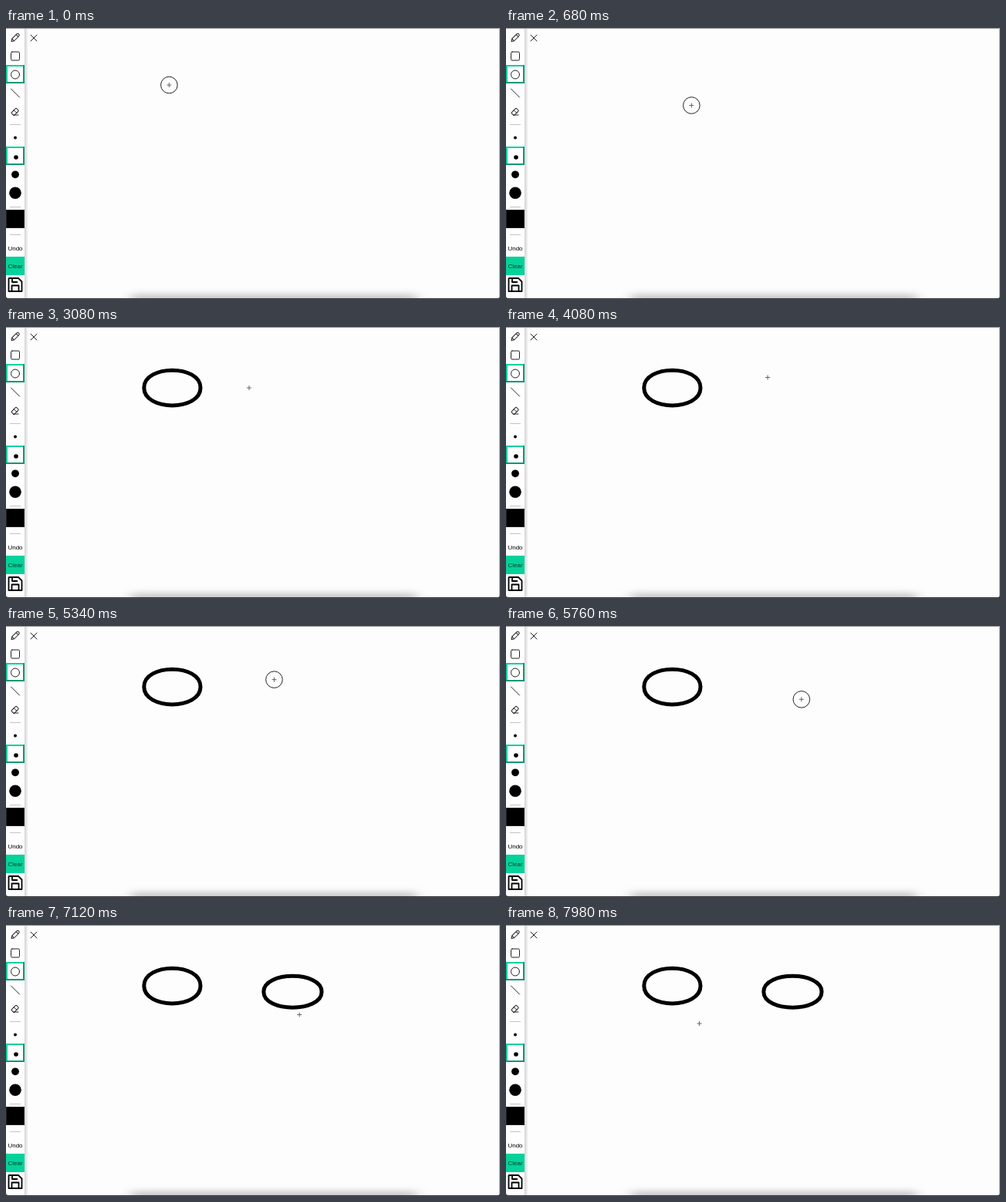
Animation, 640 px wide and 352 px high, one loop 8000 ms. Source, as an HTML page:

```html
<!DOCTYPE html>
<html lang="en">
<head>
<meta charset="utf-8">
<title>Whiteboard</title>
<style>
  html, body { margin: 0; width: 100%; height: 100%; overflow: hidden; background: #fdfdfd; }
  svg { display: block; width: 640px; height: 352px; }
  text { font: 8px "Liberation Sans", Arial, sans-serif; text-anchor: middle; }
  .icon { fill: none; stroke: #222; stroke-linecap: round; stroke-linejoin: round; }
  .shape { fill: none; stroke: #000; stroke-width: 5; }
</style>
</head>
<body>
<svg viewBox="0 0 640 352">
  <defs>
    <linearGradient id="edge">
      <stop stop-color="#d2d2d6"/>
      <stop offset="1" stop-color="#fdfdfd"/>
    </linearGradient>
    <filter id="soft" x="-10%" y="-200%" width="120%" height="500%">
      <feGaussianBlur stdDeviation="8 4"/>
    </filter>
  </defs>

  <rect width="640" height="352" fill="#fdfdfd"/>
  <rect x="162" y="346" width="370" height="14" fill="#c4c4c4" filter="url(#soft)"/>
  <rect x="24" width="5" height="352" fill="url(#edge)"/>
  <rect width="24" height="352" fill="#fefefe"/>
  <g id="toolbar"></g>
  <path class="icon" d="M32 9l8 8m0-8l-8 8"/>

  <!-- Window frame -->
  <path d="M0 .5H639.500V352" stroke="#999" fill="none"/>
  <path d="M0 348q0 3 3 3h634q3 0 3-3v4H0z" fill="#333"/>

  <path id="first" class="shape"/>
  <path id="second" class="shape"/>
  <g id="cursor" fill="none">
    <circle id="ring" r="10.800" stroke="#222"/>
    <path d="M-3 0H3M0-3V3" stroke="#555" stroke-width=".9"/>
  </g>
</svg>
<script>
  const LOOP = 8000, ROW = 24;
  const FIRST_RELEASE = 1560, SECOND_PRESS = 4640, SECOND_RELEASE = 6560;
  const byId = id => document.getElementById(id);
  const cursor = byId('cursor'), ring = byId('ring');
  const first = byId('first'), second = byId('second');

  // Toolbar parts, each placed by its vertical centre
  const at = (y, content) => `<g transform="translate(12 ${y})">${content}</g>`;
  const icon = content => `<g class="icon">${content}</g>`;
  const dot = radius => `<circle r="${radius}"/>`;
  const divider = '<path d="M-7 0H7" stroke="#c4c4c4"/>';
  const selection = `<g fill="none" stroke-width="2">
    <path d="M-11 12V-11H12" stroke="#06d0a0"/><path d="M-12 11H11V-12" stroke="#109878"/></g>`;
  const tools = [
    '<path transform="rotate(45)" d="M-2-4.500V4L0 7 2 4V-4.500q0-2-2-2t-2 2zM-2-3.500H2M-2 4H2"/>',
    '<rect x="-5.500" y="-5.500" width="11" height="11" rx="1.500"/>',
    '<circle r="5.500"/>',
    '<path d="M-5.500-5.500L5.500 5.500"/>',
    '<rect x="-5" y="-2.500" width="9" height="5" rx="1" transform="rotate(-45)"/><path d="M-2-2L2 2M-2 4.500H4"/>'
  ].map(icon);
  const disk = `<path d="M-8-8.500H4L8.500-4V8.500H-8.500V-8zM-4-8.500v5H3M-4.500 8.500V1H4.500V8.500"
    fill="none" stroke="#000" stroke-width="1.800" stroke-linejoin="round"/>`;

  byId('toolbar').innerHTML = [
    at(60, selection), at(166, selection),
    ...tools.map((tool, i) => at(12.5 + ROW * i, tool)),
    ...[125.5, 232.5, 268.5].map(y => at(y, divider)),
    at(142.5, dot(2)), at(168, '<g transform="translate(1)">' + dot(2.8) + '</g>'),
    at(190.3, dot(4.9)), at(214.2, dot(7.8)),
    at(248, '<rect x="-11.500" y="-11.500" width="23" height="23" stroke="#222"/>'),
    at(285.5, '<text y="3">Undo</text>'),
    at(309, '<rect x="-12" y="-12" width="24" height="24" fill="#05d29a"/><text y="3" fill="#033d2c">Clear</text>'),
    at(333.5, disk)
  ].join('');

  // The cursor rests between glides and slows towards the end of each
  const home = { x: 211.3, y: 74 };
  const glides = [
    { from: 0, to: 1260, x: 253.5, y: 112.5 },
    { from: 1400, to: 1560, x: 251.5, y: 109.5 },
    { from: 2660, to: 3400, x: 340, y: 67 },
    { from: 3760, to: 4080, x: 339, y: 65.5 },
    { from: 4180, to: 4500, x: 333.5, y: 59.5 },
    { from: 5200, to: 6300, x: 408.5, y: 114 },
    { from: 7000, to: 7980, x: 250.5, y: 128 }
  ];

  function cursorAt(time) {
    let { x, y } = home;
    for (const glide of glides) {
      const progress = Math.min(1, Math.max(0, (time - glide.from) / (glide.to - glide.from)));
      const eased = 1 - (1 - progress) ** 1.5;
      x += (glide.x - x) * eased;
      y += (glide.y - y) * eased;
    }
    return [x, y];
  }

  // Oval from two curves whose handles sit on the corners of the dragged box
  function oval(x1, y1, x2, y2) {
    const mid = (y1 + y2) / 2;
    return `M${x1} ${mid}C${x1} ${y1} ${x2} ${y1} ${x2} ${mid}C${x2} ${y2} ${x1} ${y2} ${x1} ${mid}Z`;
  }

  const show = (element, visible) => element.setAttribute('visibility', visible ? 'visible' : 'hidden');

  function draw(time) {
    cursor.setAttribute('transform', `translate(${cursorAt(time)})`);
    show(ring, time < FIRST_RELEASE || (time >= SECOND_PRESS && time < SECOND_RELEASE));
    show(first, time >= FIRST_RELEASE);
    show(second, time >= SECOND_RELEASE);
  }

  first.setAttribute('d', oval(178.8, 48.5, 252, 109.5));
  second.setAttribute('d', oval(333.8, 59.5, 409, 114));

  const start = performance.now();
  function frame() {
    draw((performance.now() - start) % LOOP);
    requestAnimationFrame(frame);
  }
  frame();
</script>
</body>
</html>
```
